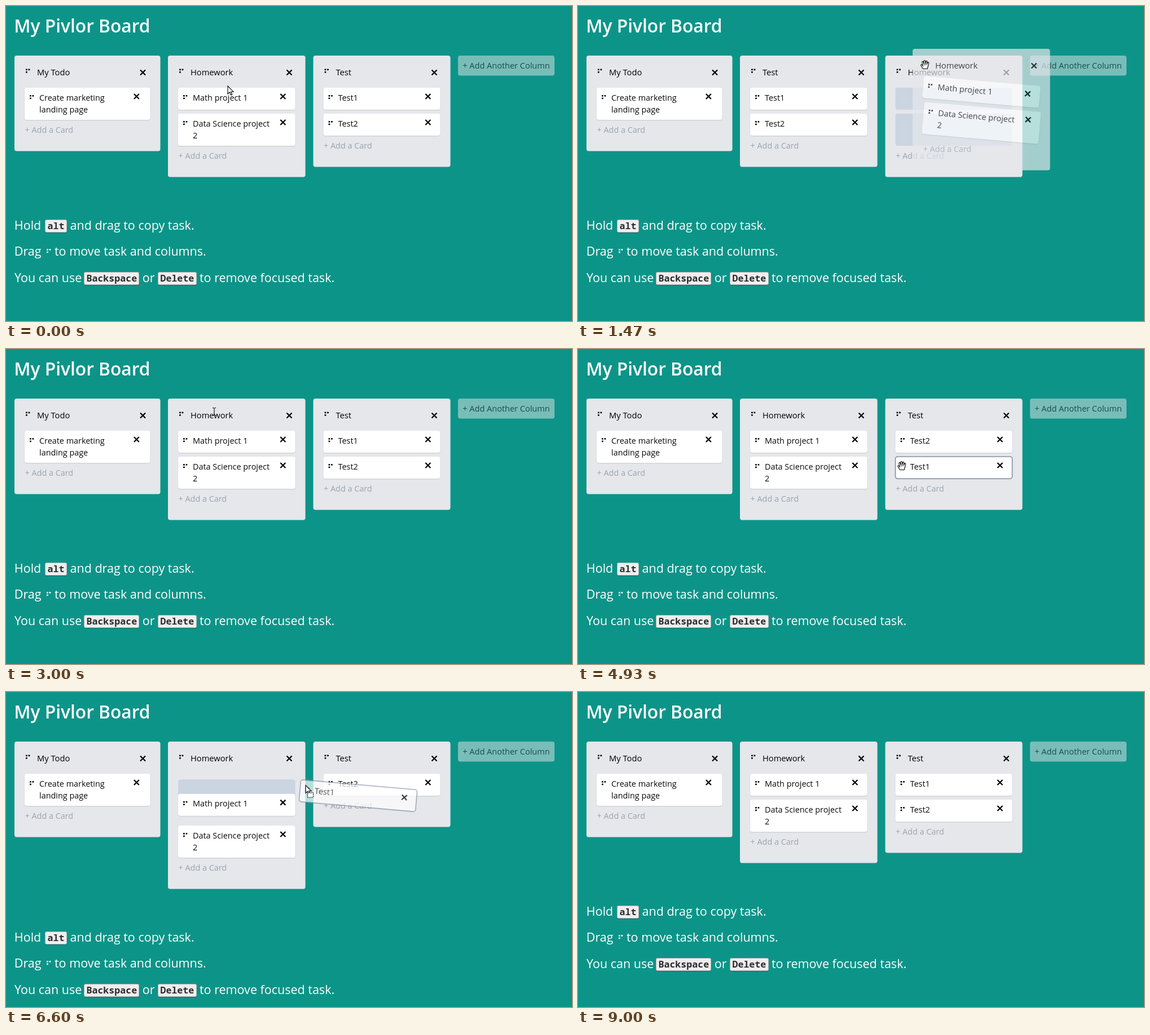
Write an HTML page with a canvas that moves like this. It is 1003 by 559 pixels and loops after 9070 ms.

```html
<!DOCTYPE html>
<html lang="en">
<head>
<meta charset="utf-8">
<title>Task board</title>
<style>
  html, body { margin: 0; width: 100%; height: 100%; overflow: hidden; background: #0d9488; }
  canvas { display: block; }
</style>
</head>
<body>
<canvas id="stage" width="1003" height="559"></canvas>
<script>
const LOOP = 9070;
const stage = document.getElementById('stage');
const layer = stage.cloneNode();
const main = stage.getContext('2d');
const overlay = layer.getContext('2d');
let g = main;

const slots = [[15, 258.5], [287, 243.5], [544.5, 243]];
const titles = { A: 'My Todo', H: 'Homework', T: 'Test' };
const cards = {
  a: ['Create marketing', 'landing page'],
  m: ['Math project 1'],
  d: ['Data Science project', '2'],
  1: ['Test1'],
  2: ['Test2']
};

// Board order over time: column:cards
const layouts = [
  [0, 'A:a H:md T:12'], [930, 'A:a T:12 H:md'], [2460, 'A:a H:md T:12'],
  [4110, 'A:a H:md T:21'], [5130, 'A:a H:m1d T:2'], [6511, 'A:a H:1md T:2'],
  [7600, 'A:a H:md T:12']
].map(([start, order]) => ({ start, spots: place(order) }));

const drags = [[730, 1900, 'H'], [2330, 2980, 'H'], [3870, 4500, '1'], [5000, 7970, '1']];
const focus = [3850, 8970];

// time, x, y, pointer shape from here on
const path = [
  [0, 393, 142, 'arrow'], [70, 393, 142, 'arrow'], [450, 309, 108, 'hand'],
  [730, 309, 108, 'hand'], [1270, 615, 96, 'hand'], [1470, 615, 96, 'hand'],
  [1870, 578, 97, 'hand'], [1930, 567, 104, 'hand'], [2330, 568, 105, 'hand'],
  [2640, 367, 103, 'hand'], [2980, 369, 103, 'beam'], [3190, 369, 103, 'arrow'],
  [3530, 577, 149, 'arrow'], [3640, 577, 149, 'hand'], [3870, 577, 149, 'drag'],
  [4330, 577, 209, 'drag'], [4500, 577, 209, 'hand'], [4730, 577, 209, 'hand'],
  [4900, 574, 199, 'hand'], [4935, 574, 199, 'hand'], [5000, 573, 192, 'drag'],
  [5300, 430, 192, 'drag'], [5600, 330, 190, 'drag'], [5900, 317, 195, 'drag'],
  [6200, 380, 202, 'drag'], [6530, 473, 176, 'drag'], [6600, 531, 165.5, 'drag'],
  [6850, 556, 136, 'drag'], [7150, 548, 128, 'drag'], [7470, 552, 150, 'drag'],
  [7600, 572, 158, 'drag'], [7670, 603.5, 160.5, 'drag'], [7930, 587, 153, 'drag'],
  [7970, 587, 153, 'hand'], [8330, 585, 153, 'arrow'], [8720, 78, 540, 'none'],
  [LOOP, 78, 540, 'none']
];

const shapes = {
  arrow: new Path2D('M0 0v14l3.3-3 2.2 5 2.2-1-2.2-4.8h4.6z'),
  hand: new Path2D('M-3.5 15.5L-7 10C-8 8-6.3 7.3-5 8.8L-4 10-5.3 4C-5.5 2.2-3.6 1.8-3 3.5L-2 6.8V2' +
    'C-2 0 .4 0 .5 2L.6 6.5 1.6 2.5C2 .9 4 1.2 3.8 3L3.3 7 4.6 4.6C5.5 3.2 7 4 6.6 5.6L5 12 4 15.5Z'),
  beam: new Path2D('M-3 1.5h2.5M3 1.5h-2.5M0 2v12M-3 14.5h2.5M3 14.5h-2.5')
};

function place(order) {
  const spots = {};
  order.split(' ').forEach((part, i) => {
    const [id, ids] = part.split(':');
    const [x, w] = slots[i];
    const inset = i ? 0 : 2.5;
    let y = 145;
    for (const card of ids) {
      const h = cards[card].length > 1 ? 57 : 39;
      spots[card] = { x: x + 18, y, w: w - 36, h, inset };
      y += h + 7;
    }
    spots[id] = { x, y: 88, w, h: y - 39.5, inset, ids };
  });
  return spots;
}

const lerp = (a, b, k) => a + (b - a) * k;
const easeOut = k => 1 - (1 - Math.min(1, k)) ** 3;
const smooth = k => k * k * (3 - 2 * k);

function pointerAt(t) {
  const i = path.findLastIndex(key => key[0] <= t);
  const from = path[i], to = path[i + 1] || from;
  const k = to === from ? 0 : smooth((t - from[0]) / (to[0] - from[0]));
  return { x: lerp(from[1], to[1], k), y: lerp(from[2], to[2], k), shape: from[3] };
}

function spotsAt(t) {
  const i = layouts.findLastIndex(layout => layout.start <= t);
  const now = layouts[i], before = layouts[Math.max(0, i - 1)].spots;
  const k = easeOut((t - now.start) / 230);
  const spots = {};
  for (const id in now.spots) {
    const spot = now.spots[id], old = before[id];
    spots[id] = { ...spot, x: lerp(old.x, spot.x, k), y: lerp(old.y, spot.y, k) };
  }
  return spots;
}

function box(x, y, w, h, r, fill) {
  g.beginPath();
  g.roundRect(x, y, w, h, r);
  g.fillStyle = fill;
  g.fill();
}

function text(str, x, y, size = 14.4, color = '#0b0b0b', weight = 400, family = '"Open Sans", sans-serif') {
  g.font = `${weight} ${size}px ${family}`;
  g.fillStyle = color;
  g.fillText(str, x, y);
}

function withShadow(color, blur, draw) {
  g.save();
  g.shadowColor = color;
  g.shadowBlur = blur;
  g.shadowOffsetY = 1;
  draw();
  g.restore();
}

function handle(x, y, color = '#000') {
  for (const [dx, dy] of [[0, 0], [4.5, 0], [0, 4.5]]) box(x + dx, y + dy, 2.8, 2.8, 0.8, color);
}

function cross(x, y) {
  g.beginPath();
  for (const s of [1, -1]) {
    g.moveTo(x - 4.5, y - 4.5 * s);
    g.lineTo(x + 4.5, y + 4.5 * s);
  }
  g.strokeStyle = '#000';
  g.lineWidth = 2.3;
  g.stroke();
}

function drawColumn(id, { x, y, w, h, inset }) {
  box(x, y, w, h, 4, '#e5e7eb');
  handle(x + 20, y + 23.5);
  text(titles[id], x + 40, y + 35, 14.7, '#000', 500);
  cross(x + w - 28.5 - inset, y + 30);
  text('+ Add a Card', x + 18.5, y + h - 32.5, 14.4, '#9ca3af');
}

function drawCard(id, { x, y, w, h, inset }, { held, focused, tilt = 0 }) {
  if (held) return box(x, y, w, h, 4, '#cbd5e1');
  g.save();
  g.translate(x + w / 2, y + h / 2);
  g.rotate(tilt);
  g.translate(-w / 2, -h / 2);
  withShadow('rgba(0,0,0,.12)', 2, () => box(0, 0, w, h, 4, '#fff'));
  if (focused) {
    g.strokeStyle = '#8491a5';
    g.lineWidth = 1.6;
    g.stroke();
  }
  handle(9, 13);
  cards[id].forEach((line, i) => text(line, 26, 22.7 + 21.4 * i));
  cross(w - 21.7 - inset, 15.5);
  g.restore();
}

function drawGhost(id, spot, dx, dy, focused) {
  const home = layouts.find(layout => layout.spots[id] === spot).spots;
  const shift = s => ({ ...s, x: s.x + dx, y: s.y + dy });
  const tilt = Math.PI / 36;
  g = overlay;
  g.clearRect(0, 0, 1003, 559);
  if (spot.ids) {
    drawColumn(id, shift(spot));
    for (const card of spot.ids) drawCard(card, shift(home[card]), { tilt });
  } else {
    drawCard(id, shift(spot), { tilt, focused });
  }
  g = main;
  g.globalAlpha = 0.7;
  g.drawImage(layer, 0, 0);
  g.globalAlpha = 1;
}

function drawKey(label, x, y, w) {
  withShadow('rgba(0,0,0,.25)', 1, () => box(x, y, w, 23, 3, '#b4b4b4'));
  box(x + 1, y + 1, w - 2, 21, 2, '#eee');
  text(label, x + 4.5, y + 17, 16.6, '#2b2b2b', 700, '"Noto Sans Mono", monospace');
}

function drawHelp(shift) {
  const say = (str, x, y) => text(str, x, y + shift, 21.5, '#fff');
  say('Hold', 14.8, 396.5);
  drawKey('alt', 69, 379 + shift, 39);
  say('and drag to copy task.', 113.5, 396.5);
  say('Drag', 14.8, 443);
  handle(72, 431 + shift, '#fff');
  say('to move task and columns.', 86, 443);
  say('You can use', 15, 489.5);
  drawKey('Backspace', 138, 472 + shift, 98);
  say('or', 241.8, 489.5);
  drawKey('Delete', 269, 472 + shift, 69);
  say('to remove focused task.', 343, 489.5);
}

function drawPointer({ x, y, shape }) {
  if (shape === 'none') return;
  g.save();
  g.translate(x, y);
  g.strokeStyle = '#000';
  g.fillStyle = '#fff';
  g.lineWidth = 1.1;
  const outline = shapes[shape] || shapes.arrow;
  if (shape !== 'beam') g.fill(outline);
  g.stroke(outline);
  if (shape === 'drag') {
    g.setLineDash([2, 1]);
    g.fillRect(3.5, 13.5, 10, 8);
    g.strokeRect(3.5, 13.5, 10, 8);
  }
  g.restore();
}

function draw(t) {
  const spots = spotsAt(t);
  const pointer = pointerAt(t);
  const drag = drags.find(([from, to]) => t >= from && t < to);
  const held = drag ? drag[2] : '';
  const focused = t >= focus[0] && t < focus[1];
  const columns = Object.keys(titles);

  g.fillStyle = '#0d9488';
  g.fillRect(0, 0, 1003, 559);
  text('My Pivlor Board', 14.2, 47, 31.7, '#fff', 600);
  g.globalAlpha = 0.5;
  box(801, 88, 171, 35.5, 4, '#e5e7eb');
  g.globalAlpha = 0.8;
  text('+ Add Another Column', 809.3, 111, 14.5, '#00302c');
  g.globalAlpha = 1;

  for (const id of columns) drawColumn(id, spots[id]);
  for (const id of columns) {
    for (const card of spots[id].ids) {
      drawCard(card, spots[card], { held: held === card || held === id, focused: focused && card === '1' });
    }
  }
  drawHelp(Math.max(...columns.map(id => spots[id].h)) - 215.5);

  if (drag) {
    const start = pointerAt(drag[0]);
    const home = layouts.findLast(layout => layout.start <= drag[0]).spots[held];
    drawGhost(held, home, pointer.x - start.x, pointer.y - start.y, focused);
  }
  drawPointer(pointer);
}

function tick() {
  draw(performance.now() % LOOP);
  requestAnimationFrame(tick);
}
tick();
</script>
</body>
</html>
```
